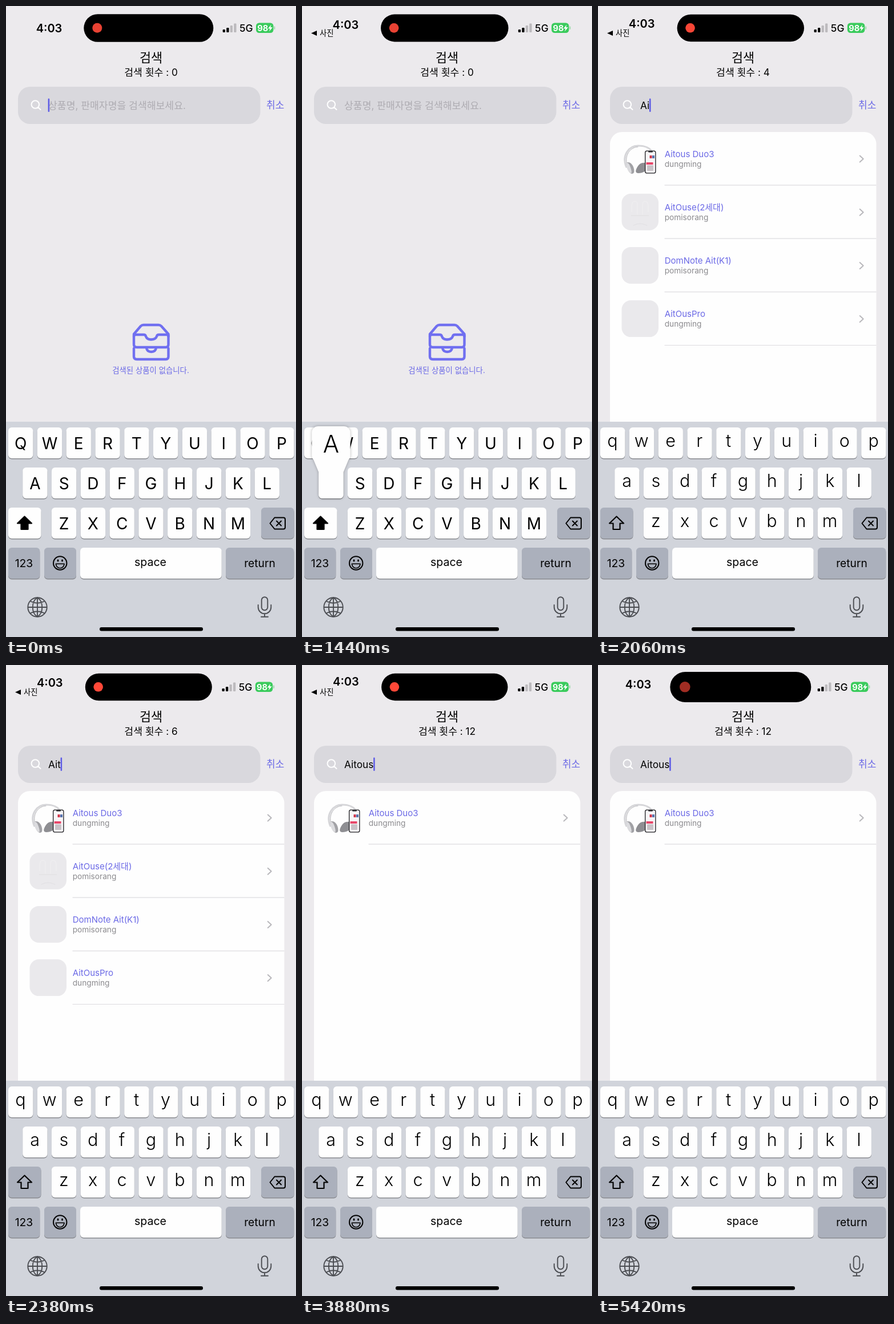
Animation, 508 px wide and 1102 px high, one loop 5530 ms. Source, as an HTML page with a canvas:

```html
<!DOCTYPE html>
<html lang="ko">
<head>
<meta charset="utf-8">
<style>
  html, body { margin: 0; width: 100%; height: 100%; overflow: hidden; background: #eceaed; }
  canvas { display: block; }
</style>
</head>
<body>
<canvas id="stage" width="508" height="1102"></canvas>
<script>
const ctx = document.getElementById('stage').getContext('2d');
const LOOP = 5530, END = 5190;
const ACCENT = '#6b69e6', BG = '#eceaed', KEY_GREY = '#abb0bc';
const FONTS = "Inter, 'Noto Sans CJK KR', 'Noto Sans CJK', sans-serif";

const QUERY = 'Aitous';
const TYPED_AT = [1450, 1850, 2170, 2580, 2950, 3190];
const ITEMS = [
  ['Aldun Clock 하나 더 팝니다', 'ninthSeller'],
  ['Aldun Clock Grand 팝니다', 'ninthSeller'],
  ['A', 'mumomu'],
  ['Aitous Duo3', 'dungming', drawHeadphones, 180],
  ['Aldun Clock TR15', 'dungming'],
  ['AitOuse(2세대)', 'pomisorang', drawBuds, 200],
  ['DomNote Ait(K1)', 'pomisorang'],
  ['AitOusPro', 'dungming'],
];
const KEY_W = 43.3, KEY_H = 54;
const KEY_ROWS = [['qwertyuiop', 4, 736], ['asdfghjkl', 29.2, 806], ['zxcvbnm', 79.9, 876]];
const KEYS = KEY_ROWS.flatMap(([letters, x, y]) =>
  [...letters].map((letter, i) => ({ letter, x: x + i * 50.8, y })));

const clamp = v => Math.max(0, Math.min(1, v));
const mix = (a, b, p) => a + (b - a) * p;

function text(str, x, y, size, color = '#000', weight = 400, align = 'left') {
  ctx.font = `${weight} ${size}px ${FONTS}`;
  ctx.textAlign = align;
  ctx.fillStyle = color;
  ctx.fillText(str, x, y);
}
function box(x, y, w, h, r, color) {
  ctx.fillStyle = color;
  ctx.beginPath();
  ctx.roundRect(x, y, w, h, r);
  ctx.fill();
}
function fill(d, color) {
  ctx.fillStyle = color;
  ctx.fill(new Path2D(d));
}
function stroke(d, color, width) {
  ctx.strokeStyle = color;
  ctx.lineWidth = width;
  ctx.lineCap = ctx.lineJoin = 'round';
  ctx.stroke(new Path2D(d));
}
function at(x, y, draw) {
  ctx.save();
  ctx.translate(x, y);
  draw();
  ctx.restore();
}

function dotLevel(t) {
  const stops = [[0, .91], [750, .83], [1690, .94], [2380, 1], [END, 1], [5420, .63], [LOOP, .63]];
  const i = stops.findIndex(s => t < s[0]);
  const [t0, a] = stops[i - 1], [t1, b] = stops[i];
  return mix(a, b, (t - t0) / (t1 - t0));
}

function drawStatusBar(t) {
  const spring = (1 + t / 700) * Math.exp(-t / 700);
  const stop = clamp((t - END) / 230);
  const grow = mix(mix(-2.9, 0, spring), 10, stop);
  const side = grow / 2;

  const halfW = 113.5 + grow, h = 48.6 + grow * .45;
  box(249.8 - halfW, 38.5 - h / 2, halfW * 2, h, h / 2, '#000');
  const level = dotLevel(t), r = 8.5 + grow * .08;
  box(159.8 - grow * .75 - r, 38.3 - r, r * 2, r * 2, r,
    `rgb(${255 * level}, ${72 * level}, ${56 * level})`);

  const timeY = mix(mix(28.9, 38.3, spring), 34, stop);
  text('4:03', 75.5 - side, timeY + 7.3, 20, '#000', 600, 'center');
  ctx.globalAlpha = clamp((t - 60) / 500) * (1 - stop);
  fill('M16 47.5L26 43V52Z', '#000');
  text('사진', 31, 52.3, 13.3);
  ctx.globalAlpha = 1;

  at(side, 0, () => {
    [5, 8, 12, 15.5].forEach((bar, i) =>
      box(379.7 + i * 6.5, 46 - bar, 4.3, bar, 1.2, i < 2 ? '#000' : '#bcbabd'));
    text('5G', 409, 45, 17.5, '#000', 500);
    box(438, 29.5, 30.5, 17.5, 5.5, '#3acb5c');
    box(469.5, 35.5, 1.8, 5.5, 1, '#9bd9a9');
    text('98', 440.3, 43.6, 14.6, '#fff', 700);
    fill('M464.5 32.5L459 39.5H462.5L461 44.5L467 37.2H463.2Z', '#fff');
  });
}

function drawSearch(t, query) {
  text('검색', 254, 98, 21.8, '#000', 500, 'center');
  text('검색 횟수 : ' + query.length * 2, 254, 121.5, 17.2, '#000', 400, 'center');
  box(21, 141, 424.5, 65, 21, '#d9d8dd');
  stroke('M44.5 172a6.8 6.8 0 1 0 13.6 0a6.8 6.8 0 1 0 -13.6 0M56.5 177L60.5 181', '#fff', 2);
  text('취소', 456, 179.2, 17, ACCENT);
  if (query) text(query, 74, 179.8, 17.3);
  else text('상품명, 판매자명을 검색해보세요.', 74, 179.5, 17.2, '#aeacb2');

  // The caret stays solid while typing and blinks when idle.
  let phase = 0;
  if (!query) phase = (t + 210) % 1000;
  else if (t > 3380) phase = (t - 3380) % 1000;
  ctx.globalAlpha = phase < 850 ? clamp((650 - phase) / 150) : (phase - 850) / 150;
  const caretX = query ? 73.7 + ctx.measureText(query).width : 73.6;
  box(caretX, 161.5, 2.6, 23.5, 1.2, '#5f5de6');
  ctx.globalAlpha = 1;
}

function drawEmpty() {
  stroke('M224 577V573L236 559Q238 557 241 557H267Q270 557 272 559L284.5 573V577', '#706ff0', 4.4);
  stroke('M224 577Q224 574 227 574H241Q244.5 574 245 577Q247 582.5 254 582.5Q262 582.5 264 577' +
    'Q264.5 574 268 574H281.5Q284.5 574 284.5 577V591Q284.5 596 280 596H229Q224 596 224 591Z', '#706ff0', 4.4);
  stroke('M224 598V612Q224 617 229 617H280Q284.5 617 284.5 612V598M246 597Q247 604 254.5 604Q262 604 263 597',
    '#706ff0', 4.4);
  text('검색된 상품이 없습니다.', 253.5, 641, 13.4, ACCENT, 400, 'center');
}

function drawHeadphones() {
  box(41.5, 14.5, 64.5, 64, 16, '#fefefe');
  stroke('M49.5 61C41 40 55 24 70 24C82 24 93 28 96 38', '#d6d6d9', 3.2);
  stroke('M51.5 58C45 41 57 26 70 26', '#a9a9ad', .9);
  fill('M49 54Q57 50 62 61Q66 73 59 73Q52 71 49 54Z', '#a2a2a6');
  fill('M49 54Q54 52 57 62Q60 71 58 72Q51 70 49 54Z', '#dcdcdf');
  fill('M83 54Q74 52 69 61Q63 71 70 72Q78 72 83 68Z', '#8e8e92');
  box(82, 32.5, 19.5, 40, 3.5, '#1c1c20');
  box(83.3, 33.8, 16.9, 37.4, 2.5, '#f8f6f8');
  box(88, 33.5, 8, 2, 1, '#1c1c20');
  box(90.5, 41, 4, 5, 0, '#d0354a');
  box(95, 41, 4, 5, 0, '#5876b0');
  box(84.5, 53, 12, 4, 0, '#e8476a');
  box(86, 58, 11, 10, 1, '#c9c3c8');
}

function drawBuds() {
  box(41.5, 14.5, 64.5, 64, 16, '#eae9ec');
  stroke('M59 46V36Q59 28 65 28Q69 28 69 34V51M88 46V36Q88 28 82 28Q78 28 78 34V51', '#efeef0', 1.3);
  stroke('M58 53H89M62 70Q73 64 86 70', '#e2e1e4', 1.2);
}

function drawList(t, query) {
  const refreshed = TYPED_AT[query.length - 1];
  box(21, 220, 466.5, 520, [21, 21, 0, 0], '#fefefe');
  ITEMS.filter(([name]) => name.includes(query)).slice(0, 6).forEach(([name, seller, photo, delay], i) =>
    at(0, 220 + i * 93.2, () => {
      if (photo && t >= refreshed + delay) photo();
      else box(41.5, 14.5, 64.5, 64, 16, '#eae9ec');
      text(name, 116.7, 43.5, 15, ACCENT);
      text(seller, 116.7, 60.8, 13.7, '#8b8a8e');
      stroke('M458.7 41.5L464.7 47L458.7 52.5', '#b9b8bc', 2);
      box(116.5, 92.3, 371, 1.2, 0, '#dddce0');
    }));
}

function drawKey(x, y, w, color = '#fefefe') {
  box(x, y + 1.4, w, KEY_H, 6, '#898b90');
  box(x, y, w, KEY_H, 6, color);
}

function drawPopup({ letter, x, y }, upper) {
  const w = KEY_W + 24, left = Math.max(2, Math.min(506 - w, x - 12));
  ctx.save();
  ctx.shadowColor = 'rgba(0,0,0,.28)';
  ctx.shadowBlur = 5;
  ctx.fillStyle = '#fefefe';
  ctx.beginPath();
  ctx.roundRect(left, y - 72, w, 62, 11);
  ctx.roundRect(x, y - 6, KEY_W, KEY_H + 6, 6);
  ctx.moveTo(left + 2, y - 16);
  ctx.lineTo(left + w - 2, y - 16);
  ctx.lineTo(x + KEY_W, y + 8);
  ctx.lineTo(x, y + 8);
  ctx.fill();
  ctx.restore();
  text(upper ? letter.toUpperCase() : letter, left + w / 2, y - 26, 42, '#000', 300, 'center');
}

function drawKeyboard(t, query) {
  const upper = !query;
  box(0, 726, 508, 376, 0, '#d1d4db');
  for (const { letter, x, y } of KEYS) {
    drawKey(x, y, KEY_W);
    if (upper) text(letter.toUpperCase(), x + KEY_W / 2, y + 38, 28, '#000', 400, 'center');
    else text(letter, x + KEY_W / 2 - .2, y + 34.2, 30.5, '#000', 300, 'center');
  }

  drawKey(4, 876, 57.5, upper ? '#fefefe' : KEY_GREY);
  const arrow = 'M32.5 891.5L45 903.5H38.5V914H26.5V903.5H20Z';
  if (upper) fill(arrow, '#000');
  stroke(arrow, '#000', 2.2);

  drawKey(447, 876, 57.5, KEY_GREY);
  stroke('M470.5 893.5H486Q489 893.5 489 896.5V910.5Q489 913.5 486 913.5H470.5L462.5 903.5Z' +
    'M474 899.5L482 907.5M482 899.5L474 907.5', '#000', 2);

  drawKey(4, 946, 55.3, KEY_GREY);
  text('123', 31.5, 980, 19.3, '#000', 400, 'center');
  drawKey(67, 946, 56, KEY_GREY);
  stroke('M83 973a11.7 11.7 0 1 0 23.4 0a11.7 11.7 0 1 0 -23.4 0', '#000', 2);
  stroke('M91 967.7V969.3M98.5 967.7V969.3', '#000', 2.6);
  stroke('M87.3 974.2H102.1Q101 981.7 94.7 981.7Q88.4 981.7 87.3 974.2Z', '#000', 1.6);
  drawKey(130, 946, 247.7);
  text('space', 253, 978, 19.5, '#000', 400, 'center');
  drawKey(385, 946, 119.3, KEY_GREY);
  text('return', 444.5, 979.5, 19.2, '#000', 400, 'center');

  stroke('M38.3 1050a16.7 16.7 0 1 0 33.4 0a16.7 16.7 0 1 0 -33.4 0M55 1033.3V1066.7M38.3 1050H71.7' +
    'M55 1033.3C44 1040 44 1060 55 1066.7C66 1060 66 1040 55 1033.3' +
    'M42.5 1039.5Q55 1046 67.5 1039.5M42.5 1060.5Q55 1054 67.5 1060.5', '#4b4d52', 1.9);
  stroke('M447.7 1037.5a5.3 5.3 0 0 1 10.6 0V1050a5.3 5.3 0 0 1 -10.6 0Z' +
    'M441.7 1046V1050a11.3 11.3 0 0 0 22.6 0V1046M453 1061.5V1066.7M447 1066.7H459', '#4b4d52', 1.9);
  box(164, 1085, 181, 6.4, 3.2, '#000');

  const pressed = TYPED_AT.findIndex(time => t >= time - 90 && t < time + 20);
  if (pressed >= 0) {
    const letter = QUERY[pressed].toLowerCase();
    drawPopup(KEYS.find(key => key.letter === letter), pressed === 0);
  }
}

const start = performance.now();
function frame() {
  const t = (performance.now() - start) % LOOP;
  const query = QUERY.slice(0, TYPED_AT.filter(time => t >= time).length);
  box(0, 0, 508, 1102, 0, BG);
  drawStatusBar(t);
  drawSearch(t, query);
  if (query) drawList(t, query);
  else drawEmpty();
  drawKeyboard(t, query);
  requestAnimationFrame(frame);
}
frame();
</script>
</body>
</html>
```
